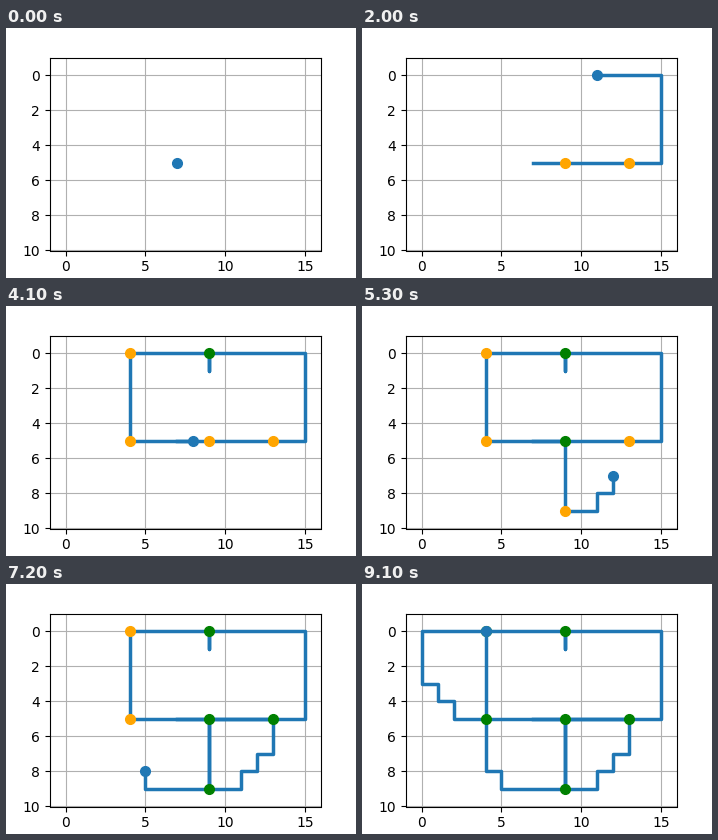
Recreate the animation shown at these times as a matplotlib script. Size 350 by 250 pixels, loop 9200 ms.

```python
import numpy as np
import matplotlib.pyplot as plt
from matplotlib.animation import FuncAnimation

START = (7, 5)
# Key places of the tour, each with the number of stairs on the way there.
TOUR = [((15, 0), 0), ((9, 1), 0), ((9, 0), 0), ((4, 0), 0), ((4, 5), 0),
        ((9, 9), 0), ((13, 5), 2), ((9, 9), 0), ((4, 5), 1), ((0, 0), 2),
        ((4, 0), 0)]


def corridor(begin, end, stairs):
    """Cells going sideways, over the stairs, then up or down to the end."""
    x, y = begin
    dx, dy = (int(d) for d in np.sign(np.subtract(end, begin)))
    while (x, y) != end:
        if abs(end[0] - x) > stairs:
            x += dx
        elif x != end[0]:
            y += dy
            yield x, y
            x += dx
        else:
            y += dy
        yield x, y


def explore():
    route = [START]
    for place, stairs in TOUR:
        route += corridor(route[-1], place, stairs)

    exits = {cell: set() for cell in route}
    for a, b in zip(route, route[1:]):
        exits[a].add(b)
        exits[b].add(a)
    junctions = [cell for cell in exits if len(exits[cell]) > 2]

    # Wait one step before a junction, unless coming back from a dead end.
    steps = [START, START]
    for a, b in zip(route, route[1:]):
        if b in junctions and len(exits[a]) > 1:
            steps.append(a)
        steps.append(b)
    return steps, junctions


steps, junctions = explore()

fig, ax = plt.subplots(figsize=(3.5, 2.5), dpi=100)
ax.set_xlim(-1, 16)
ax.set_ylim(10, -1)
ax.grid(True)

trail, = ax.plot([], [], color="C0", lw=2.5)
once, twice, walker = (ax.plot([], [], "o", color=color, ms=7)[0]
                       for color in ("orange", "green", "C0"))


def show(line, cells):
    line.set_data([x for x, _ in cells], [y for _, y in cells])


def update(k):
    seen = steps[:k + 1]
    show(trail, seen)
    show(once, [j for j in junctions if seen.count(j) == 1])
    show(twice, [j for j in junctions if seen.count(j) > 1])
    show(walker, seen[-1:])
    return trail, once, twice, walker


anim = FuncAnimation(fig, update, frames=len(steps), interval=100, repeat=True)
plt.show()
```
